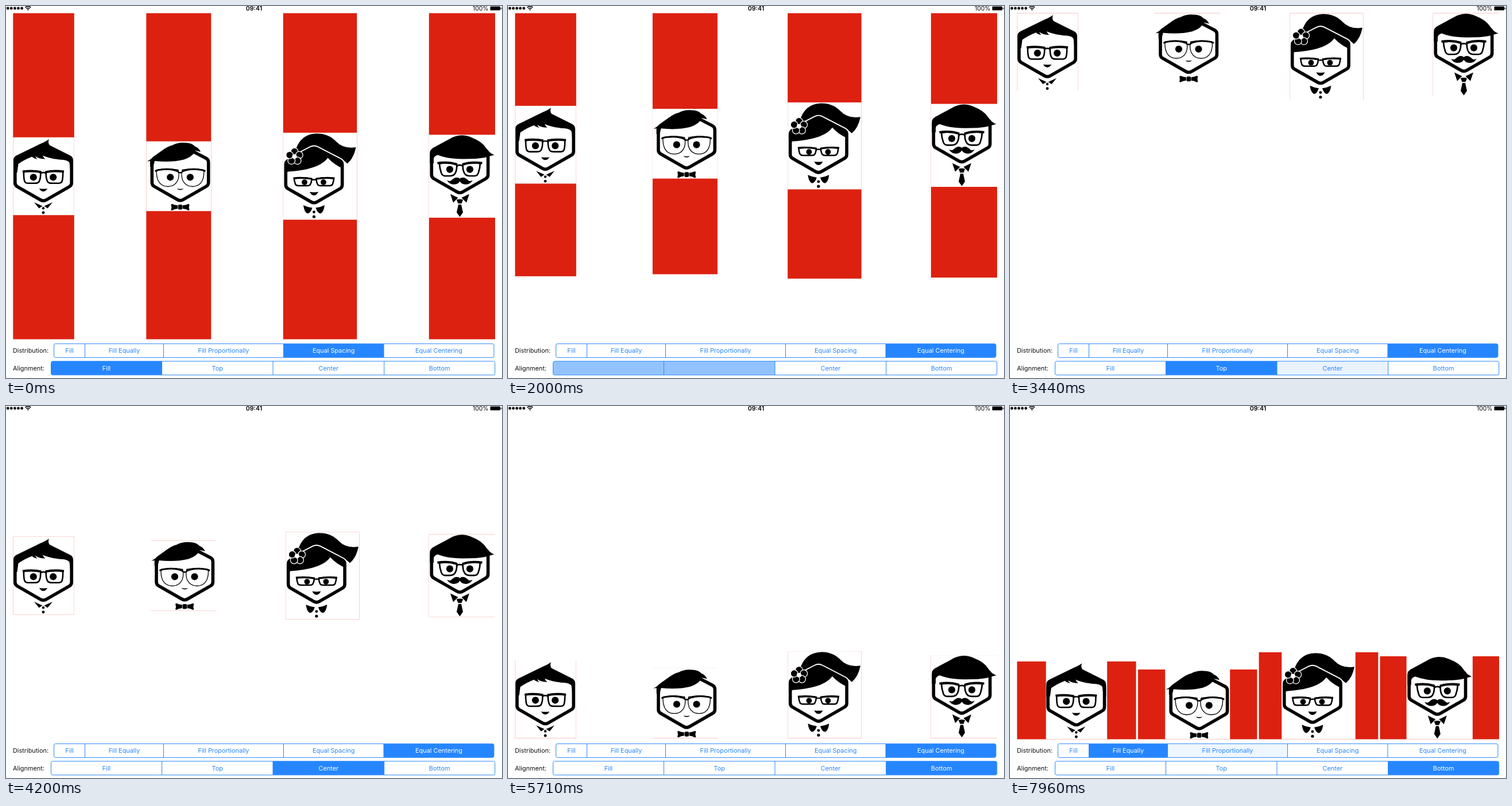
Write an HTML page that moves like this. It is 864 px wide and 648 px high and loops after 8000 ms.

```html
<!DOCTYPE html>
<html lang="en">
<head>
<meta charset="utf-8">
<title>Stack layout demo</title>
<style>
  html, body { margin: 0; height: 100%; overflow: hidden; background: #fff; }
  svg { display: block; width: 100vw; height: 100vh; }
  text { font-family: Inter, Roboto, sans-serif; font-size: 10.9px; }
  .seg text { text-anchor: middle; }
  .seg .edge { fill: none; stroke: #2a87fb; }
  .line { fill: none; stroke: #000; stroke-linejoin: round; }
  .paper { fill: #fff; }
  .red { fill: #dc2110; }
</style>
</head>
<body>
<svg viewBox="0 0 864 648" xmlns="http://www.w3.org/2000/svg">
  <defs>
    <path id="hex" stroke-linejoin="round" d="M-49.2-69V-34Q-49.2-29.5-45.5-27.4L-5-4.2Q0-1.3 5-4.2L45.5-27.4Q49.2-29.5 49.2-34V-69Q49.2-74 45.5-76L5-97Q0-99.5-5-97L-45.5-76Q-49.2-74-49.2-69Z"/>
  </defs>

  <g id="status">
    <g id="dots"></g>
    <g class="line" stroke-width="1.5">
      <path d="M33.3 2.6Q38.3-1.6 43.3 2.6M35.2 4.7Q38.3 2.2 41.4 4.7"/>
      <path d="M37.2 6.4H39.4" stroke-width="2"/>
    </g>
    <text x="432" y="8" text-anchor="middle" style="font-size:10.6px;font-weight:600">09:41</text>
    <text x="840.5" y="8" text-anchor="end" style="font-size:10.4px">100%</text>
    <rect x="843.5" y=".8" width="17.5" height="6.8" rx="1.2"/>
    <rect x="861.7" y="2.8" width="1.5" height="2.8" rx=".7"/>
  </g>

  <g class="view">
    <rect class="red"/>
    <g class="pic">
      <rect class="paper"/>
      <use href="#hex" x="65" y="342" fill="#fff" stroke="#000" stroke-width="5.6"/>
      <path d="M13 290V268Q13 263 18 260.5L60 240Q70 236 74.8 232Q72.6 239 76 242.5L112 260.5Q117 263 117 269V290H112.6L110.5 273Q108 269 100 268C90 267.5 78 266 64 260.5Q65 264 68.5 266.5Q57 266.5 51 261.5Q52 264.5 54.5 266.8Q48 265.5 45.5 262.5Q33 267 21.5 275L19.4 290Z"/>
      <g id="half1">
        <path class="line" stroke-width="2.6" d="M31 288.5Q46 286.8 60 289Q61 300 57.5 306Q56 308.7 50 308.7H38Q33 308.7 32 304Q30.6 298 31 288.5Z"/>
        <path class="line" stroke-width="4" d="M29 288.6Q47 286.2 61.5 289.4"/>
        <path class="line" stroke-width="2.4" d="M60 292Q62 290 65 290"/>
        <circle cx="47.8" cy="298.3" r="6.1"/>
        <path d="M49 342L63.5 348.5L57.5 352.5Z"/>
      </g>
      <use href="#half1" transform="translate(130) scale(-1 1)"/>
      <path d="M57.8 318Q65 319.2 72.2 318Q69 323.2 65 323.2Q61 323.2 57.8 318Z"/>
      <circle cx="65" cy="352.3" r="2.2"/><circle cx="65" cy="360" r="2.4"/>
    </g>
  </g>

  <g class="view">
    <rect class="red"/>
    <g class="pic">
      <rect class="paper"/>
      <use href="#hex" x="303.5" y="341.5" fill="#fff" stroke="#000" stroke-width="5.6"/>
      <path d="M245.5 270.5Q253 267 256 263L270 253Q282 244 290 242.5Q300 236.5 316 238.5Q325 239.5 329 244.5Q336 247 339 254L330 252Q326 262 310 267.5Q288 273 259 270L256.5 280H251V270Z"/>
      <g id="half2">
        <path class="line" stroke-width="1.3" d="M262.5 286Q280 281.5 300 285.5Q302.5 296 299 304Q294 314.5 282 314.5Q270 314.5 265 304Q261.5 296 262.5 286Z"/>
        <path class="line" stroke-width="3" d="M259.8 288Q263 285.5 270 285Q287 282.5 300.5 288.5"/>
        <path class="line" stroke-width="2.4" d="M299.5 289Q301 290.5 304 290.2"/>
        <circle cx="286.2" cy="298.3" r="6.1"/>
        <path d="M287.5 346Q288 344.5 290 345Q295 347.5 299 347V353.2Q294 353 290 355.8Q287.8 356.5 287.5 355Q289 350.5 287.5 346Z"/>
      </g>
      <use href="#half2" transform="translate(607) scale(-1 1)"/>
      <rect x="299.8" y="346" width="7.6" height="8.6" rx="2.2"/>
      <path d="M297.5 318Q303.5 319.4 309.5 318Q303.5 323 297.5 318Z"/>
    </g>
  </g>

  <g class="view">
    <rect class="red"/>
    <g class="pic">
      <rect class="paper"/>
      <path d="M503 256Q511 223.5 540 222.3Q561 221.5 575 236Q588 249.5 609.5 246Q606 265 594.5 274.5Q588 267 575 264L537 250Z"/>
      <use href="#hex" x="536.5" y="345.5" fill="#fff" stroke="#fff" stroke-width="9.4"/>
      <use href="#hex" x="536.5" y="345.5" fill="#fff" stroke="#000" stroke-width="5.6"/>
      <path d="M486 291V274L536.5 246L587 272V283Q572 277 560.5 264.5Q546 285 491.5 288.5Z"/>
      <g id="flower" stroke="#fff" stroke-width="1.3"></g>
      <circle class="paper" cx="502.5" cy="262.3" r="4"/>
      <g id="half3">
        <path class="line" stroke-width="2.5" d="M502 300.5Q518 298.5 532.5 301Q532.5 307 530 311Q529 313 525 313H509Q505 313 504 310Q502.3 306 502 300.5Z"/>
        <path class="line" stroke-width="3.2" d="M500.5 300Q518 298.2 533.5 301.2"/>
        <path class="line" stroke-width="2.2" d="M532 303.4Q534 302.4 537 302.4"/>
        <circle cx="520" cy="307" r="4.9"/>
        <path d="M518 347Q525 350.5 533.5 351.5Q530.5 361 525 361.5Q519.5 359 518 347Z"/>
      </g>
      <use href="#half3" transform="translate(1073) scale(-1 1)"/>
      <path d="M529 323.8Q536.5 325 544 323.8Q541 330 536.5 330Q532 330 529 323.8Z"/>
      <circle cx="536.5" cy="358.8" r="2.4"/><circle cx="536.5" cy="367" r="2.6"/>
    </g>
  </g>

  <g class="view">
    <rect class="red"/>
    <g class="pic">
      <rect class="paper"/>
      <use href="#hex" x="790.5" y="328" fill="#fff" stroke="#000" stroke-width="5.6"/>
      <path d="M738.5 274V254Q739 250 745 246.5L772 232Q791 220 812 229.5Q829 236 836 247Q842 256.5 850.5 259.5Q842 261.5 834 264Q822 266.5 796 266.5Q770 266.5 752 259.5Q746 261 745 266V274Z"/>
      <g id="half4">
        <path class="line" stroke-width="2.7" d="M755 274.5Q770 271.5 785 275.5Q786 286 782 292Q779.5 296 773 296H765Q759.5 296 758 290Q755.5 283 755 274.5Z"/>
        <path class="line" stroke-width="4" d="M751.5 273.8Q770 270.8 786 276"/>
        <path class="line" stroke-width="2.6" d="M785 279Q787 277 791 277"/>
        <circle cx="773" cy="284.6" r="6.1"/>
        <path d="M790.8 301Q787 297.5 782 299.3Q778 301.5 775.5 304Q772.5 306 768.3 303.5Q771 309.5 778 310.8Q787 311.5 790.8 305Z"/>
        <path d="M774 327.5L787.5 334L779 342.5Z"/>
      </g>
      <use href="#half4" transform="translate(1581) scale(-1 1)"/>
      <path d="M784.8 337.5Q790.5 335.5 796.2 337.5L793.5 344H787.5ZM788 345.8H793L796 359.5L790.5 367.5L785 359.5Z"/>
    </g>
  </g>

  <text x="12" y="604.3" fill="#111">Distribution:</text>
  <text x="12" y="634.5" fill="#111">Alignment:</text>
  <g id="controls"></g>
</svg>

<script>
const NS = 'http://www.w3.org/2000/svg';
const LOOP = 8000, LEFT = 12.3, WIDTH = 839.7, TOP = 12.5, HEIGHT = 568;
const BLUE = '#2686ff';
const sizes = [[106.5, 135.5], [113, 121.5], [128.5, 151.5], [115.2, 144.5]];

const clamp = v => Math.min(1, Math.max(0, v));
const sum = list => list.reduce((a, b) => a + b, 0);

function set(el, attrs) {
  for (const k in attrs) el.setAttribute(k, attrs[k]);
  return el;
}
const add = (parent, tag, attrs) =>
  parent.appendChild(set(document.createElementNS(NS, tag), attrs));

// Horizontal layouts: [x, width] for each view
const widths = sizes.map(s => s[0]);
const gap = (WIDTH - sum(widths)) / 3;
const firstMid = LEFT + widths[0] / 2;
const midStep = (LEFT + WIDTH - widths[3] / 2 - firstMid) / 3;
const spacing = widths.map((w, i) => [LEFT + sum(widths.slice(0, i)) + gap * i, w]);
const centering = widths.map((w, i) => [firstMid + midStep * i - w / 2, w]);
const equal = widths.map((w, i) => [LEFT + WIDTH / 4 * i, WIDTH / 4]);

// Vertical layouts: [y, height] for each view
const align = k => sizes.map(([, h]) => [TOP + (HEIGHT - h) * k, h]);
const fill = sizes.map(() => [TOP, HEIGHT]);

// Underdamped spring, damping ratio 0.5
function spring(ms) {
  if (ms <= 0) return 0;
  const a = ms * 0.00413, d = 1 / Math.sqrt(3);
  return 1 - Math.exp(-d * a) * (Math.cos(a) + d * Math.sin(a));
}

// cubic-bezier(.42, 0, .58, 1) over 800 ms
function easeInOut(ms) {
  const x = clamp(ms / 800);
  let lo = 0, hi = 1;
  for (let i = 0; i < 20; i++) {
    const s = (lo + hi) / 2, r = 1 - s;
    if (1.26 * s * r * r + 1.74 * s * s * r + s * s * s < x) lo = s; else hi = s;
  }
  return lo * lo * (3 - 2 * lo);
}

const distribution = {
  names: ['Fill', 'Fill Equally', 'Fill Proportionally', 'Equal Spacing', 'Equal Centering'],
  edges: [83.5, 137.5, 274.5, 483.5, 658, 850], y: 588.3, first: 3,
  taps: [[200, 4], [6480, 1], [LOOP, 2]],
  layouts: [spacing, centering, equal], ease: spring
};
const alignment = {
  names: ['Fill', 'Top', 'Center', 'Bottom'],
  edges: [78.5, 271.5, 465, 658.7, 851.7], y: 618.8, first: 0,
  taps: [[1722, 1], [3440, 2], [4966, 3]],
  layouts: [fill, align(0), align(0.5), align(1)], ease: easeInOut
};

function buildControl(c, id) {
  const g = add(document.getElementById('controls'), 'g', { class: 'seg' });
  const box = { x: c.edges[0], y: c.y, width: c.edges.at(-1) - c.edges[0], height: 24, rx: 3 };
  add(add(g, 'clipPath', { id }), 'rect', box);
  const fills = add(g, 'g', { 'clip-path': `url(#${id})`, fill: BLUE });
  c.parts = c.names.map((name, i) => {
    const x = c.edges[i], w = c.edges[i + 1] - x;
    const back = add(fills, 'rect', { x, y: c.y, width: w, height: 24 });
    if (i) add(g, 'path', { class: 'edge', d: `M${x} ${c.y}v24` });
    const label = add(g, 'text', { x: x + w / 2, y: c.y + 16 });
    label.textContent = name;
    return { back, label };
  });
  add(g, 'rect', { ...box, class: 'edge' });
}

function drawControl(c, t) {
  c.parts.forEach(({ back, label }, i) => {
    let on = i === c.first ? 1 : 0, press = 0, last = c.first;
    for (const [start, to] of c.taps) {
      const q = clamp((t - start) / 556);
      if (i === last) on -= q;
      if (i === to) {
        on += q;
        if (q < 1) press = 0.1 * clamp((t - start + 100) / 80);
      }
      last = to;
    }
    set(back, { opacity: Math.max(on, press) });
    set(label, { fill: on > 0.5 ? '#fff' : BLUE, opacity: Math.abs(2 * on - 1) });
  });
}

function place(c, i, t) {
  return [0, 1].map(k => c.layouts.slice(1).reduce((v, next, n) =>
    v + (next[i][k] - c.layouts[n][i][k]) * c.ease(t - c.taps[n][0]), c.layouts[0][i][k]));
}

const views = [...document.querySelectorAll('.view')].map((el, i) => {
  const [w, h] = sizes[i], x = spacing[i][0], y = align(0.5)[i][0];
  set(el.querySelector('.paper'), { x, y, width: w, height: h });
  return { red: el.querySelector('.red'), pic: el.querySelector('.pic'), cx: x + w / 2, cy: y + h / 2 };
});

for (let i = 0; i < 5; i++) {
  add(document.getElementById('dots'), 'circle', { cx: 3.2 + i * 6.1, cy: 4, r: 2.4 });
  const a = (i * 72 - 90) * Math.PI / 180;
  add(document.getElementById('flower'), 'circle',
    { cx: 502.5 + 8.8 * Math.cos(a), cy: 262.3 + 8.8 * Math.sin(a), r: 6.3 });
}
buildControl(distribution, 'clipA');
buildControl(alignment, 'clipB');

function draw(t) {
  views.forEach(({ red, pic, cx, cy }, i) => {
    const [x, width] = place(distribution, i, t);
    const [y, height] = place(alignment, i, t);
    set(red, { x, y, width, height });
    set(pic, { transform: `translate(${x + width / 2 - cx} ${y + height / 2 - cy})` });
  });
  drawControl(distribution, t);
  drawControl(alignment, t);
}

const begin = performance.now();
function tick() {
  draw((performance.now() - begin) % LOOP);
  requestAnimationFrame(tick);
}
tick();
</script>
</body>
</html>
```
